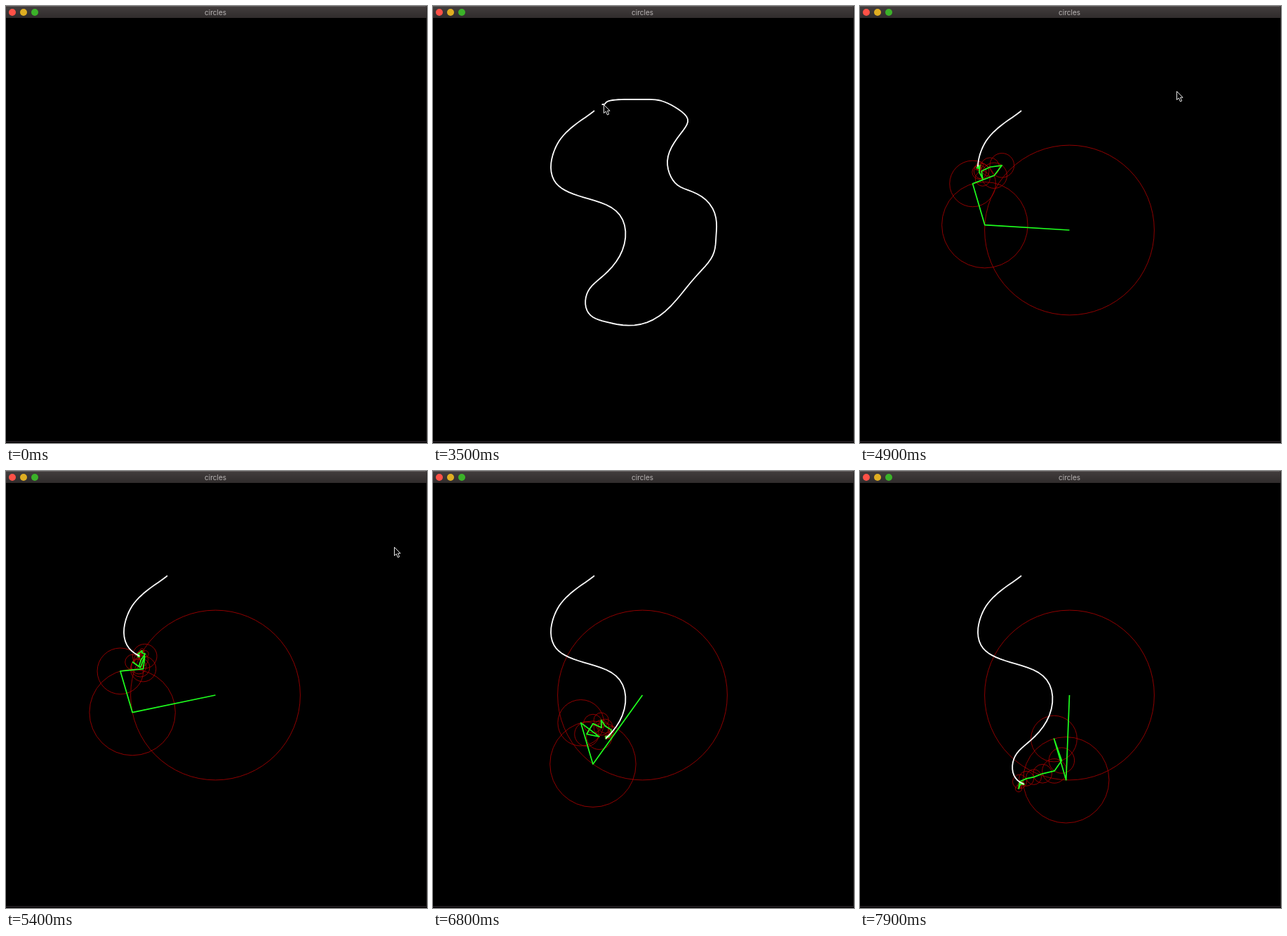
Write an HTML page with a canvas that moves like this. It is 600 px wide and 622 px high and loops after 8000 ms.

```html
<!DOCTYPE html>
<html>
<head>
<meta charset="utf-8">
<style>
  html, body { margin: 0; height: 100%; overflow: hidden; background: #000; }
  canvas { display: block; }
</style>
</head>
<body>
<canvas id="stage" width="600" height="622"></canvas>
<script>
const ctx = document.getElementById('stage').getContext('2d');
const TAU = 2 * Math.PI;
const LOOP = 8000, STEP = 100;
const DRAW_START = 805, DRAW_END = 3640;        // the mouse draws the stroke
const REPLAY_START = 3600, REPLAY_TIME = 11840; // the arms trace it again
const CENTER = [298.5, 319];

// Mouse positions at equal intervals along the closed stroke
const POINTS = `230,149 212,162 186,184 174,203 168,230 179,256 207,270 247,283 273,312
  266,356 239,387 221,406 218,429 232,445 257,452 296,453 339,427 372,388
  396,360 403,335 404,308 389,276 358,260 339,243 335,214 352,183 363,161
  345,144 321,134 299,133 277,133 256,134 246,138 243,140 242,140 241,141`
  .split(/\s+/).map(p => p.split(',').map(Number));

// One rotating arm per Fourier term, longest first
function fourier(points) {
  const n = points.length;
  return points.map((_, i) => {
    const k = i - n / 2;
    let re = 0, im = 0;
    points.forEach(([px, py], j) => {
      const x = px - CENTER[0], y = py - CENTER[1];
      const c = Math.cos(TAU * k * j / n), s = Math.sin(TAU * k * j / n);
      re += (x * c + y * s) / n;
      im += (y * c - x * s) / n;
    });
    return { k, r: Math.hypot(re, im), angle: Math.atan2(im, re) };
  }).sort((a, b) => b.r - a.r);
}

const arms = fourier(POINTS);

// Joints from the centre to the pen; u runs from 0 to 1 along the stroke
function chain(u) {
  let [x, y] = CENTER;
  const joints = [[x, y]];
  for (const { k, r, angle } of arms) {
    const a = angle + TAU * k * u;
    joints.push([x += r * Math.cos(a), y += r * Math.sin(a)]);
  }
  return joints;
}

const pen = u => chain(u).pop();

function line(points, color, width) {
  ctx.strokeStyle = color;
  ctx.lineWidth = width;
  ctx.lineJoin = 'round';
  ctx.beginPath();
  points.forEach(([x, y]) => ctx.lineTo(x, y));
  ctx.stroke();
}

function circle(x, y, r) {
  ctx.beginPath();
  ctx.arc(x, y, r, 0, TAU);
}

function drawTrail(u) {
  const points = [];
  for (let v = 0; v < u; v += 1 / 180) points.push(pen(v));
  line([...points, pen(u)], '#fff', 1.8);
}

function drawArms(u) {
  const joints = chain(u);
  ctx.strokeStyle = '#a00000';
  ctx.lineWidth = 0.9;
  arms.forEach(({ r }, i) => {
    circle(...joints[i], r);
    ctx.stroke();
  });
  line(joints, '#1eff1e', 1.7);
}

function glide(t, t0, t1, from, to) {
  const u = Math.min(1, Math.max(0, (t - t0) / (t1 - t0))), e = u * u * (3 - 2 * u);
  return from.map((v, i) => v + (to[i] - v) * e);
}

const drawn = t => (t - DRAW_START) / (DRAW_END - DRAW_START);

function pointerAt(t) {
  const start = [230, 148], aside = [553, 108];
  if (t < DRAW_START) return glide(t, 100, 500, [435, 541], start);
  if (t < REPLAY_START) return pen(drawn(t) + 0.011);
  if (t < 4400) return glide(t, 3600, 4200, [238, 143], start);
  return glide(t, 4400, 5200, start, aside);
}

function drawPointer([x, y]) {
  ctx.save();
  ctx.translate(Math.round(x) + 0.5, Math.round(y) + 0.5);
  const shape = new Path2D('M0 0V12L2.8 9.5 5 14.5 7.2 13.5 5 8.7H8.6Z');
  ctx.fillStyle = '#000';
  ctx.fill(shape);
  ctx.strokeStyle = '#e8e8e8';
  ctx.lineWidth = 1;
  ctx.stroke(shape);
  ctx.restore();
}

function box(x, y, w, h, color) {
  ctx.fillStyle = color;
  ctx.fillRect(x, y, w, h);
}

function drawWindow() {
  box(0, 0, 600, 622, '#000');
  const bar = ctx.createLinearGradient(0, 0, 0, 17);
  bar.addColorStop(0, '#423d3d');
  bar.addColorStop(1, '#302c2c');
  box(0, 0, 600, 17, bar);
  box(0, 0, 598, 1, '#625d5d');
  box(599, 2, 1, 618, '#2a2727');
  box(0, 619, 600, 2, '#1f1b1e');
  ['#ff5147', '#dfae22', '#3bb229'].forEach((color, i) => {
    ctx.fillStyle = color;
    circle(9 + 16 * i, 9, 5);
    ctx.fill();
  });
  ctx.fillStyle = '#bab6b6';
  ctx.font = '10px Inter, "Open Sans", sans-serif';
  ctx.textAlign = 'center';
  ctx.fillText('circles', 298.5, 13);
}

function render(t) {
  drawWindow();
  if (t >= REPLAY_START) {
    const u = (t - REPLAY_START) / REPLAY_TIME;
    drawArms(u);
    drawTrail(u);
  } else if (t > DRAW_START) {
    drawTrail(drawn(t));
  }
  if (t >= 100 && t < 6300) drawPointer(pointerAt(t));
}

const origin = performance.now();
function tick() {
  const t = (performance.now() - origin) % LOOP;
  render(Math.floor(t / STEP) * STEP);
  requestAnimationFrame(tick);
}
tick();
</script>
</body>
</html>
```
